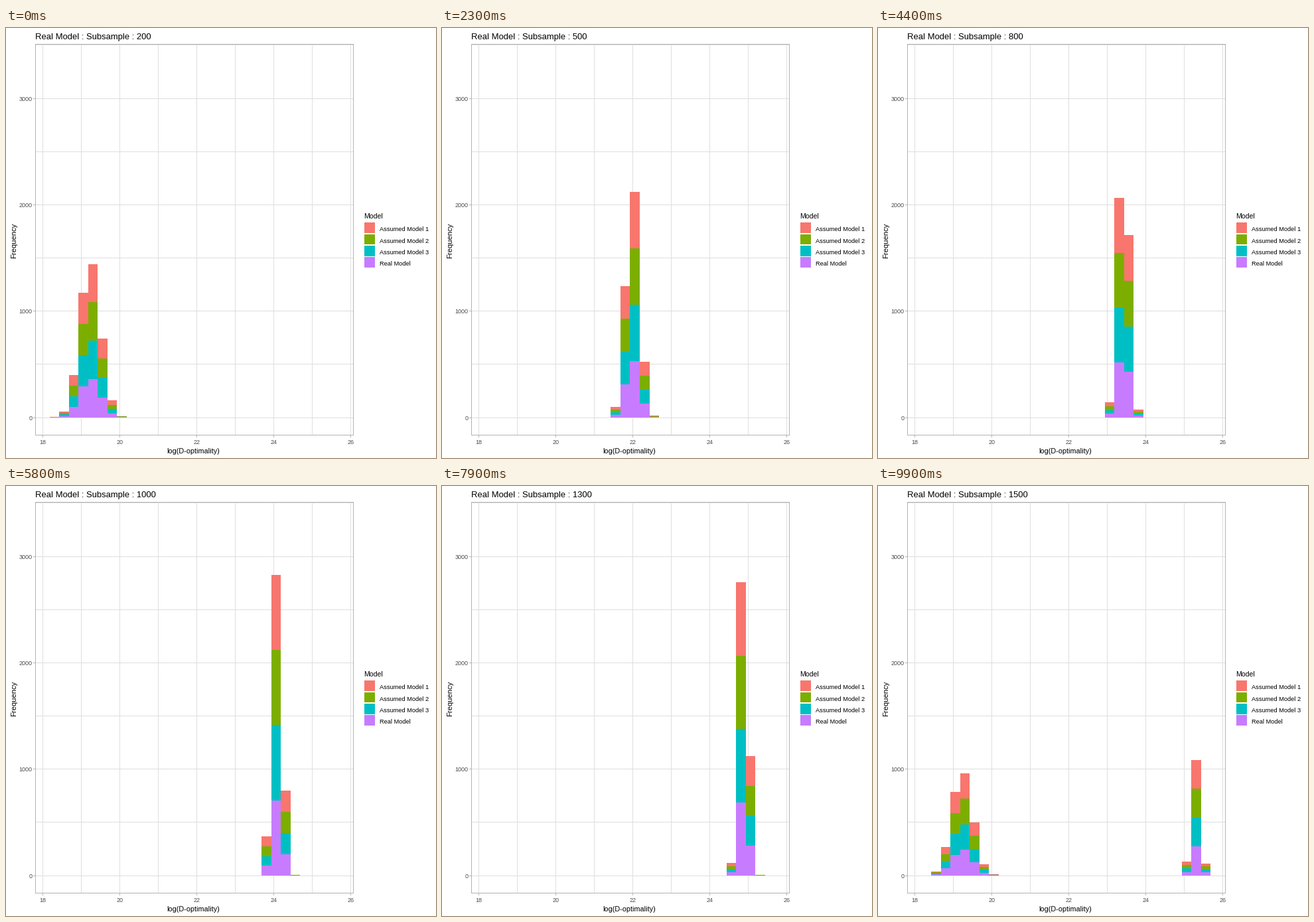
Animation, 648 px wide and 648 px high, one loop 10 s. Source, as a matplotlib script:

```python
import math

import numpy as np
import matplotlib.pyplot as plt
from matplotlib.animation import FuncAnimation
from matplotlib.patches import Rectangle

SIZE = 648
FRAMES, INTERVAL = 100, 100
BINS, RUNS = 30, 4000
BASE = 587
PX_PER_COUNT = 0.1603
GRID, BORDER, GREY = "#DEDEDE", "#B3B3B3", "#4D4D4D"
LEFT, RIGHT, TOP, BOTTOM = 44, 523, 24, 613
SAMPLES = range(200, 1600, 100)

# Legend order, which is also the stacking order from the top down
MODELS = {"Assumed Model 1": "#F8766D", "Assumed Model 2": "#7CAE00",
          "Assumed Model 3": "#00BFC4", "Real Model": "#C77CFF"}


def histogram(n):
    """Normal counts per bin; the mean grows as log n, the spread shrinks."""
    mean = 23.63 - 16 / n + 12 * math.log(n / 1000)
    sd = 14.6 / math.sqrt(n)
    cdf = [0.5 * (1 + math.erf((k - mean) / (sd * math.sqrt(2))))
           for k in range(BINS + 1)]
    return RUNS * np.diff(cdf)


def timeline():
    """For every frame: the current state and the progress to the next one."""
    frames = []
    for i in range(len(SAMPLES)):
        hold, steps = (4, 4) if i < 3 else (4, 3)
        frames += [(i, 0)] * hold
        frames += [(i, s / steps) for s in range(1, steps)]
        frames += [(i + 1, 0)]
    return frames


def schedule():
    """Starts of the moves and their number of steps."""
    moves, start = [], 4
    for i in range(len(SAMPLES)):
        moves.append((start, 4 if i < 3 else 3))
        start += 8 if i < 3 else 7
    return moves


COUNTS = [histogram(n) for n in SAMPLES]
MOVES = schedule()

plt.rcParams["font.family"] = "Liberation Sans"
fig = plt.figure(figsize=(SIZE / 72, SIZE / 72), dpi=72, facecolor="white")
ax = fig.add_axes([0, 0, 1, 1])
ax.set_xlim(0, SIZE)
ax.set_ylim(SIZE, 0)
ax.axis("off")


def box(x, y, w, h, color, z=1):
    patch = Rectangle((x, y), w, h, facecolor=color, linewidth=0,
                      antialiased=False, zorder=z)
    ax.add_patch(patch)
    return patch


def label(x, y, text, size, color="black", ha="left", **kw):
    return ax.text(x, y, text, fontsize=size, color=color, ha=ha,
                   va="baseline", **kw)


# Grid, ticks and tick labels
for x in range(18, 27):
    px = 55 + 58 * (x - 18)
    box(px, TOP, 1, BOTTOM - TOP, GRID)
    if x % 2 == 0:
        box(px, BOTTOM + 1, 1, 3, BORDER)
        label(px + 0.5, 627, str(x), 9, GREY, "center")
for count in range(0, 3501, 500):
    py = math.floor(BASE - PX_PER_COUNT * count)
    box(LEFT, py, RIGHT - LEFT, 1, GRID)
    if count % 1000 == 0:
        box(LEFT - 3, py, 3, 1, BORDER)
        label(39.3, py + 4, str(count), 9, GREY, "right")

# Panel border
for x in (LEFT, RIGHT):
    box(x, TOP, 1, BOTTOM - TOP + 1, BORDER, 8)
for y in (TOP, BOTTOM):
    box(LEFT, y, RIGHT - LEFT + 1, 1, BORDER, 8)

label(242.5, 641, "log(D-optimality)", 10.7)
label(15, 320, "Frequency", 11.2, ha="center", rotation=90,
      rotation_mode="anchor")

# Legend
label(539.5, 287, "Model", 10.5)
for i, (name, color) in enumerate(MODELS.items()):
    y = 293.3 + 17.28 * i
    box(540, round(y), 16, round(y + 15.7) - round(y), color)
    label(563, round(y) + 13, name, 9.2)

title = label(43.5, 17, "", 13)

# Each layer reaches down to the base; lower layers cover higher ones.
edges = [round(65.5 + 14.53 * k) for k in range(BINS + 1)]
layers = [[box(a, BASE, b - a, 0, color, 2 + i)
           for a, b in zip(edges, edges[1:])]
          for i, color in enumerate(MODELS.values())]


def update(frame):
    state = sum(frame >= start + steps - 1 for start, steps in MOVES)
    start, steps = MOVES[state]
    t = max(0, frame - start + 1) / steps
    counts = (1 - t) * COUNTS[state] + t * COUNTS[(state + 1) % len(COUNTS)]
    for i, layer in enumerate(layers):
        share = 1 - i / len(layers)
        for bar, count in zip(layer, counts):
            h = round(PX_PER_COUNT * share * count)
            bar.set_y(BASE - h)
            bar.set_height(h)
            bar.set_visible(h > 0)
    title.set_text(f"Real Model : Subsample : {SAMPLES[state]}")
    return []


anim = FuncAnimation(fig, update, frames=FRAMES, interval=INTERVAL,
                     init_func=lambda: update(0), repeat=True, repeat_delay=0)
plt.show()
```
